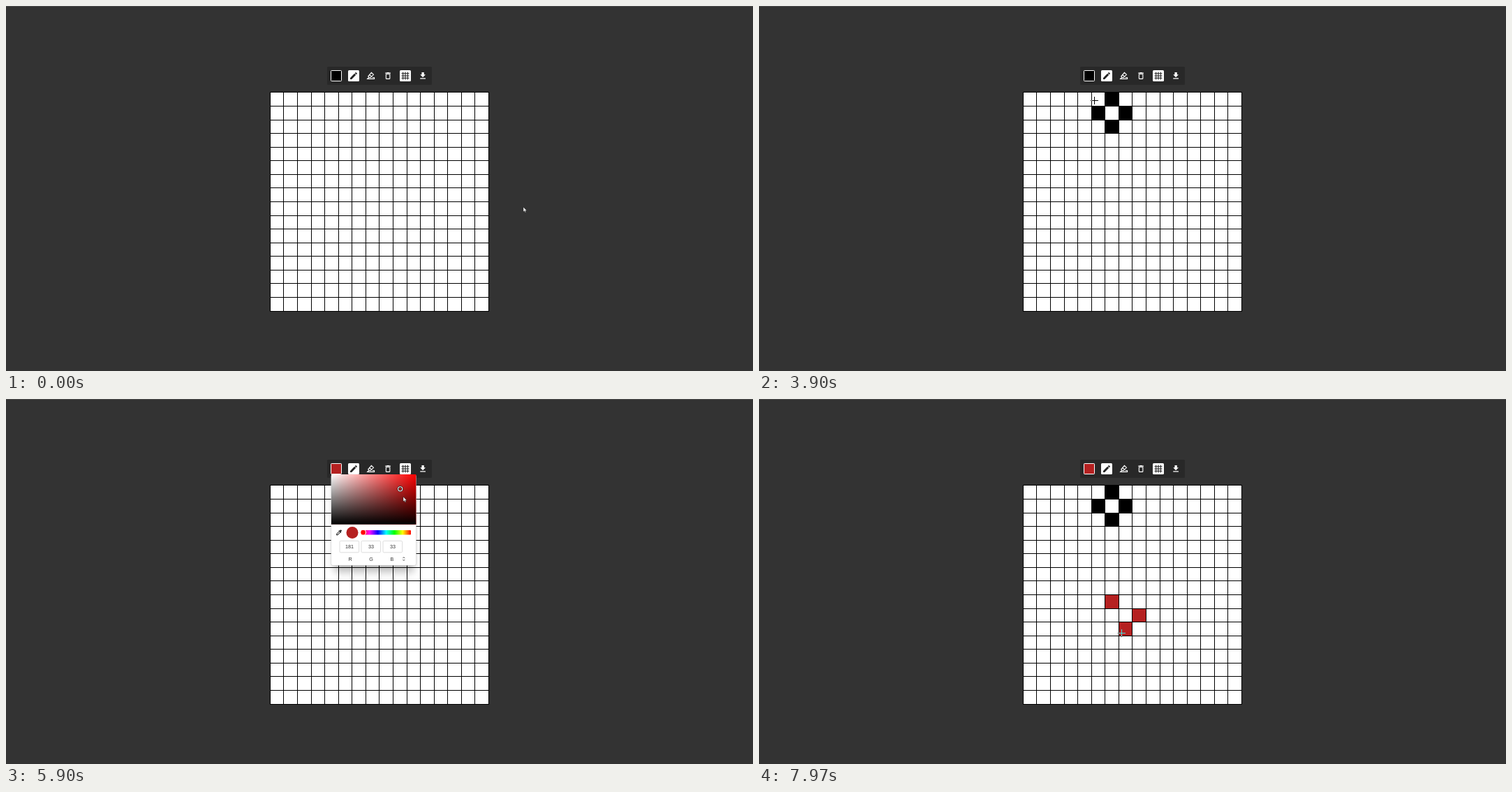
Write an HTML page that moves like this. It is 1070 px wide and 523 px high and loops after 8 s.

```html
<!DOCTYPE html>
<html lang="en">
<head>
<meta charset="utf-8">
<title>Pixel editor</title>
<style>
  html, body { margin: 0; width: 100%; height: 100%; overflow: hidden; background: #333; }
  svg { display: block; width: 1070px; height: 523px; }
  text { font: 7.2px "Liberation Sans", Arial, sans-serif; text-anchor: middle; fill: #333; }
  #grid, #cells { shape-rendering: crispEdges; }
  #cross { mix-blend-mode: difference; shape-rendering: crispEdges; }
</style>
</head>
<body>
<svg viewBox="0 0 1070 523">
  <defs>
    <linearGradient id="white"><stop stop-color="#fff"/><stop offset="1" stop-color="#fff" stop-opacity="0"/></linearGradient>
    <linearGradient id="black" x2="0" y2="1"><stop stop-opacity="0"/><stop offset="1"/></linearGradient>
    <linearGradient id="hue">
      <stop stop-color="#f00"/><stop offset=".167" stop-color="#f0f"/><stop offset=".333" stop-color="#00f"/>
      <stop offset=".5" stop-color="#0ff"/><stop offset=".667" stop-color="#0f0"/>
      <stop offset=".833" stop-color="#ff0"/><stop offset="1" stop-color="#f00"/>
    </linearGradient>
    <filter id="blur" x="-30%" y="-30%" width="160%" height="160%"><feGaussianBlur stdDeviation="6"/></filter>
  </defs>

  <rect width="1070" height="523" fill="#333"/>
  <rect width="1070" height="1" fill="#4a4a4a"/>

  <rect x="460" y="87" width="150" height="26" rx="1.5" fill="#282828"/>
  <rect id="swatch" x="465.5" y="92.5" width="15" height="15" rx=".8" stroke="#fff"/>
  <g fill="#fff">
    <rect x="490" y="92" width="16" height="16" rx="1.5"/>
    <rect x="564" y="92" width="16" height="16" rx="1.5"/>
  </g>
  <g transform="translate(491.4 93.4) scale(.55)" fill="#222">
    <path d="M3 17.25V21h3.75L17.81 9.94l-3.75-3.75zM20.71 7.04a1 1 0 0 0 0-1.41l-2.34-2.34a1 1 0 0 0-1.41 0l-1.83 1.83 3.75 3.75z"/>
  </g>
  <g transform="translate(516 93.4) scale(.55)" fill="none" stroke="#fff" stroke-width="2">
    <path d="M13.5 3.5L19 9l-7.5 7.5H8L5 13.5zM8.5 9l5.5 5.5M7 16l-4 4h18v-3.5h-5"/>
  </g>
  <g transform="translate(540.5 93.4) scale(.55)" fill="#fff" fill-rule="evenodd">
    <path d="M6 19c0 1.1.9 2 2 2h8c1.1 0 2-.9 2-2V7H6zM8 9h8v10H8zM15.5 4l-1-1h-5l-1 1H5v2h14V4z"/>
  </g>
  <g transform="translate(565.4 93.4) scale(.55)" fill="none" stroke="#222" stroke-width="1.9">
    <path d="M2 6h20M2 12h20M2 18h20M6 2v20M12 2v20M18 2v20"/>
  </g>
  <g transform="translate(590.5 93.4) scale(.55)" fill="#fff">
    <path d="M19 9h-4V3H9v6H5l7 7zM5 18v2h14v-2z"/>
  </g>

  <rect x="378" y="123" width="314" height="314" fill="#fff" shape-rendering="crispEdges"/>
  <g id="cells"></g>
  <path id="grid" fill="none" stroke="#000"/>

  <g id="picker">
    <rect x="470" y="126" width="114" height="122" fill="#000" opacity=".26" filter="url(#blur)"/>
    <rect x="465.6" y="108" width="122" height="130.6" rx="3" fill="#fff" stroke="#000" stroke-opacity=".18" stroke-width=".6"/>
    <g id="field">
      <rect x="466" y="108" width="121.3" height="71.7" fill="#f00"/>
      <rect x="466" y="108" width="121.3" height="71.7" fill="url(#white)"/>
      <rect x="466" y="108" width="121.3" height="71.7" fill="url(#black)"/>
    </g>
    <g id="ring" fill="none">
      <circle r="3.1" stroke="#111" stroke-width="2.4"/>
      <circle r="3.1" stroke="#fff" stroke-width="1.1"/>
    </g>
    <g transform="translate(471.8 186) scale(.44)" fill="#222">
      <path fill-rule="evenodd" d="M20.71 5.63l-2.34-2.34a1 1 0 0 0-1.41 0l-3.12 3.12-1.93-1.91-1.41 1.41 1.42 1.42L3 16.25V21h4.75l8.92-8.92 1.42 1.42 1.41-1.41-1.92-1.92 3.12-3.12a1 1 0 0 0 .01-1.42zM6.92 19L5 17.08l8.06-8.06 1.92 1.92z"/>
    </g>
    <circle id="preview" cx="496" cy="191.5" r="8.5"/>
    <rect x="509" y="188" width="71" height="6.4" rx="1" fill="url(#hue)"/>
    <circle cx="511.6" cy="191.2" r="3.9" fill="#f00" stroke="#fff" stroke-width="1.1"/>
    <g id="fields"></g>
    <path d="M568.4 228.2l1.4-1.6 1.4 1.6M568.4 230l1.4 1.6 1.4-1.6" fill="none" stroke="#333" stroke-width=".8"/>
  </g>

  <path id="cross" d="M-5 .5H6M.5 -5V6" stroke="#fff"/>
  <path id="arrow" d="M0 0V7L1.6 5.6 2.7 8 3.8 7.5 2.8 5.2H5Z" fill="#fff" stroke="#1c1c1c" stroke-width=".5"/>
</svg>

<script>
const LOOP = 8000, OPEN = 4270, CLOSE = 6700, PRESS = 4870;
const RED = 'rgb(181,33,33)';

// time, x, y of the pointer
const pointerPath = [
  [590, 741, 288], [700, 717, 264], [850, 655, 207], [1000, 597, 163], [1150, 549, 132],
  [1300, 517, 112], [1400, 510, 108], [1440, 510, 108], [1560, 505, 122], [1690, 497, 138],
  [1830, 497, 138], [1900, 498, 138], [2080, 498, 138], [2200, 503, 145], [2320, 516, 159],
  [2400, 523, 161], [2460, 523, 156], [2720, 523, 156], [2900, 508, 172], [3150, 507, 172],
  [3430, 499, 163], [3590, 490, 158], [3780, 490, 158], [3890, 480, 135], [3970, 480, 135],
  [4130, 474, 110], [4200, 473, 107], [4380, 474, 108], [4570, 510, 124], [4780, 555, 146],
  [4950, 577, 149], [5100, 574, 138], [5225, 569, 129], [5270, 569, 129], [5430, 572, 129],
  [5570, 573, 129], [5830, 573, 129], [5950, 567, 148], [6100, 545, 198], [6250, 521, 250],
  [6420, 509, 286], [6590, 514, 291], [6790, 514, 291], [7000, 528, 299], [7160, 541, 302],
  [7400, 541, 302], [7600, 531, 319], [7820, 519, 335]
];

// time, saturation, value of the chosen colour
const colourPath = [
  [PRESS, .9, .43], [5050, .87, .44], [5230, .821, .5255], [5270, .821, .5255],
  [5430, .819, .64], [5560, .818, .71]
];

// time, column, row, colour
const strokes = [
  [2070, 6, 0, '#000'], [2630, 7, 1, '#000'], [3050, 6, 2, '#000'], [3770, 5, 1, '#000'],
  [6700, 6, 8, RED], [7370, 8, 9, RED], [7970, 7, 10, RED]
];

const $ = id => document.getElementById(id);
const lineX = i => Math.round(377.9 + 19.57 * i);
const lineY = i => Math.round(123.4 + 19.57 * i);

function add(parent, tag, attrs, text = '') {
  const el = document.createElementNS('http://www.w3.org/2000/svg', tag);
  for (const key in attrs) el.setAttribute(key, attrs[key]);
  el.textContent = text;
  return parent.appendChild(el);
}

function sample(path, t) {
  const next = path.findIndex(p => p[0] > t);
  if (next === 0) return path[0].slice(1);
  if (next < 0) return path[path.length - 1].slice(1);
  const a = path[next - 1], b = path[next];
  const k = (t - a[0]) / (b[0] - a[0]);
  return [1, 2].map(i => a[i] + (b[i] - a[i]) * k);
}

let lines = '';
for (let i = 0; i <= 16; i++) {
  lines += `M${lineX(i) + .5} 123V437M378 ${lineY(i) + .5}H692`;
}
$('grid').setAttribute('d', lines);

const cells = strokes.map(([, col, row, fill]) => add($('cells'), 'rect', {
  x: lineX(col), y: lineY(row), fill,
  width: lineX(col + 1) - lineX(col), height: lineY(row + 1) - lineY(row)
}));

const values = ['R', 'G', 'B'].map((name, i) => {
  const x = 478 + 31 * i;
  add($('fields'), 'rect', { x, y: 203.3, width: 27.6, height: 16.6, rx: 1.5, fill: '#fff', stroke: '#d4d4d4', 'stroke-width': .8 });
  add($('fields'), 'text', { x: 493 + 30 * i, y: 231.6 }, name);
  return add($('fields'), 'text', { x: x + 14, y: 214.4 });
});

const show = (el, on) => { el.style.display = on ? '' : 'none'; };
const move = (el, x, y) => el.setAttribute('transform', `translate(${x} ${y})`);

function draw(t) {
  const isOpen = t >= OPEN && t < CLOSE;
  cells.forEach((cell, i) => show(cell, t >= strokes[i][0]));

  const [s, v] = t < PRESS ? [0, 0] : sample(colourPath, t);
  const high = Math.round(255 * v), low = Math.round(255 * v * (1 - s));
  const colour = `rgb(${high},${low},${low})`;
  $('swatch').setAttribute('fill', colour);
  $('preview').setAttribute('fill', colour);
  [high, low, low].forEach((n, i) => { values[i].textContent = n; });
  move($('ring'), 465.7 + 121 * s, 108 + 71.7 * (1 - v));
  show($('picker'), isOpen);

  const [x, y] = sample(pointerPath, t).map(Math.round);
  const onPicker = isOpen && x >= 466 && x < 588 && y >= 108 && y < 239;
  const onCanvas = x >= 378 && x < 692 && y >= 123 && y < 437 && !onPicker;
  move($('cross'), x, y);
  move($('arrow'), x, y);
  show($('cross'), onCanvas);
  show($('arrow'), !onCanvas);
}

const start = performance.now();
function tick() {
  draw((performance.now() - start) % LOOP);
  requestAnimationFrame(tick);
}
tick();
</script>
</body>
</html>
```
